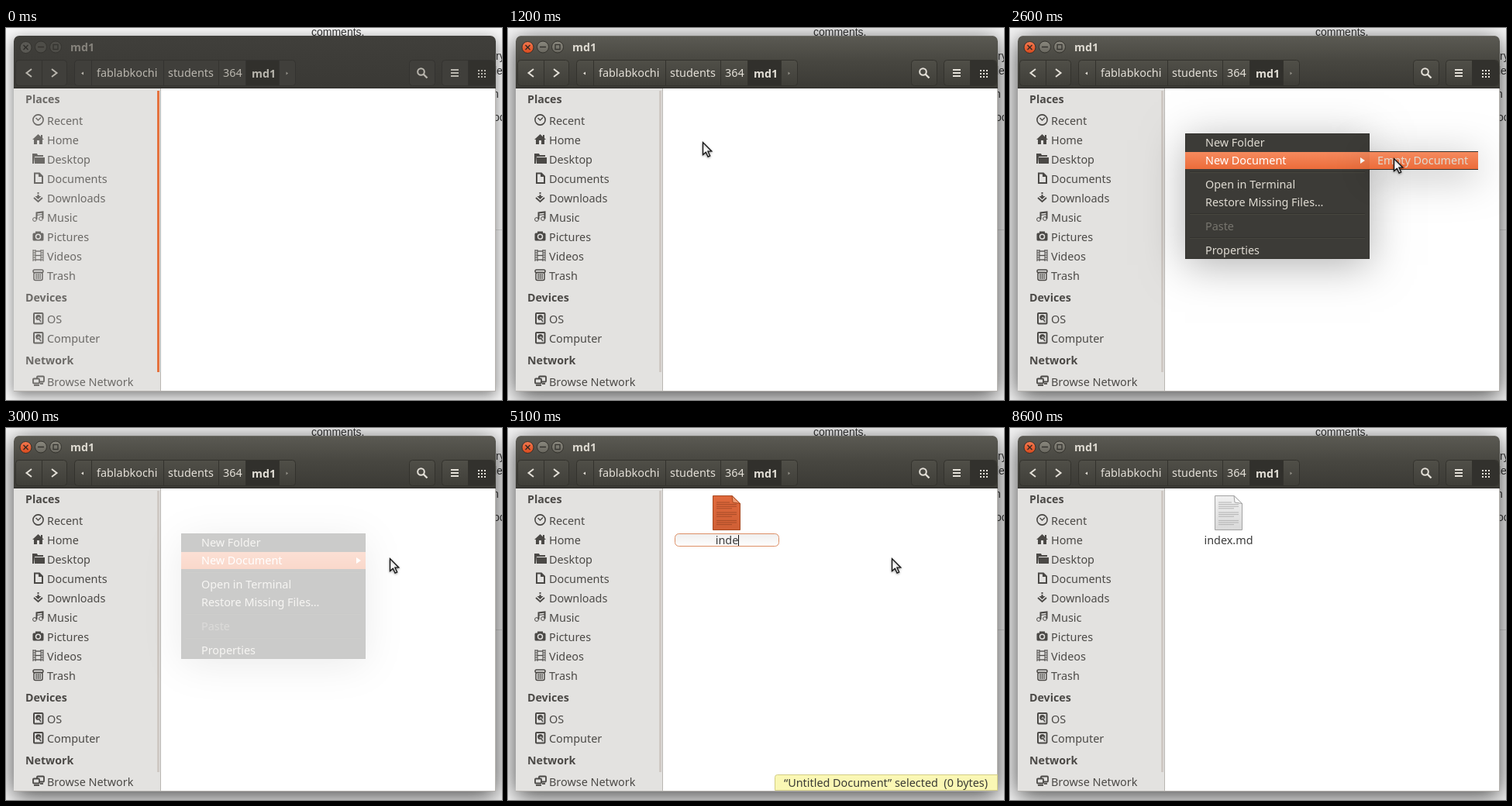
An HTML page with a canvas that plays this animation: 640x480 px, repeating every 8700 ms.

```html
<!DOCTYPE html>
<html lang="en">
<head>
<meta charset="utf-8">
<title>New document</title>
<style>
  html, body { margin: 0; width: 100%; height: 100%; overflow: hidden; background: #f5f5f5; }
  canvas { display: block; }
</style>
</head>
<body>
<canvas id="stage" width="640" height="480"></canvas>
<script>
const LOOP = 8700, STEP = 100;
const stage = document.getElementById('stage').getContext('2d');
const layer = document.createElement('canvas');
layer.width = 640;
layer.height = 480;
const menuCtx = layer.getContext('2d');
let g = stage;

const UI = '14.4px "Noto Sans", "Open Sans", sans-serif';
const BOLD = 'bold 14.2px "Noto Sans", "Open Sans", sans-serif';
const PAGE = '14px "Liberation Sans", Arial, sans-serif';

function text(str, x, y, color, font = UI, align = 'left') {
  g.font = font;
  g.textAlign = align;
  g.fillStyle = color;
  g.fillText(str, x, y);
}
function rect(x, y, w, h, color) {
  g.fillStyle = color;
  g.fillRect(x, y, w, h);
}
function round(x, y, w, h, r, fill, stroke) {
  g.beginPath();
  g.roundRect(x, y, w, h, r);
  paint(fill, stroke);
}
function disc(x, y, r, fill, stroke) {
  g.beginPath();
  g.arc(x, y, r, 0, Math.PI * 2);
  paint(fill, stroke);
}
function poly(points, fill, stroke) {
  g.beginPath();
  for (let i = 0; i < points.length; i += 2) g.lineTo(points[i], points[i + 1]);
  g.closePath();
  paint(fill, stroke);
}
function line(points, color, width = 1) {
  g.beginPath();
  for (let i = 0; i < points.length; i += 2) g.lineTo(points[i], points[i + 1]);
  g.lineWidth = width;
  g.strokeStyle = color;
  g.stroke();
  g.lineWidth = 1;
}
function paint(fill, stroke) {
  if (fill) { g.fillStyle = fill; g.fill(); }
  if (stroke) { g.strokeStyle = stroke; g.stroke(); }
}
function fade(y0, y1, ...colors) {
  const grad = g.createLinearGradient(0, y0, 0, y1);
  colors.forEach((c, i) => grad.addColorStop(i / (colors.length - 1), c));
  return grad;
}
function shadow(color, blur, dy) {
  g.shadowColor = color;
  g.shadowBlur = blur;
  g.shadowOffsetY = dy;
}
const noShadow = () => shadow('transparent', 0, 0);

// Sidebar icons, drawn in a 16 px box
const SIDE = '#e3e2e0';
const icons = {
  Recent(c) {
    g.lineWidth = 1.6;
    disc(7.5, 7.5, 6.6, null, c);
    line([4.5, 5, 7.5, 8, 11, 4.5], c, 1.4);
  },
  Home(c) {
    poly([0, 8, 7.5, 1, 15, 8, 13, 8, 13, 14, 9, 14, 9, 9, 6, 9, 6, 14, 2, 14, 2, 8], c);
    rect(11, 2, 2, 4, c);
  },
  Desktop(c) {
    poly([0, 1, 6, 1, 7, 3, 14, 3, 14, 5, 3, 5, 2, 14, 0, 14], c);
    rect(3, 6, 13, 8, c);
  },
  Documents(c) {
    g.lineWidth = 2;
    poly([3, 1.5, 9, 1.5, 13, 5.5, 13, 14, 3, 14], null, c);
    poly([8, 1, 13, 6, 8, 6], c);
  },
  Downloads(c) {
    rect(6.5, 1, 2, 2, c);
    rect(6.5, 4, 2, 3, c);
    poly([3.5, 6, 11.5, 6, 7.5, 10], c);
    line([2, 8, 7.5, 13, 13, 8], c, 1.8);
  },
  Music(c) {
    disc(3, 11, 2.4, null, c);
    disc(11, 10, 2.4, null, c);
    line([5.5, 11, 5.5, 2.5, 13.5, 1.5, 13.5, 10], c, 2);
    line([5.5, 5.5, 13.5, 4.5], c, 1.2);
  },
  Pictures(c) {
    round(0.5, 3.5, 14, 10, 1.5, c);
    rect(4, 1.5, 7, 3, c);
    g.lineWidth = 1.5;
    disc(7.5, 8.3, 3, c, SIDE);
  },
  Videos(c) {
    for (const x of [1, 4, 11, 14]) line([x, 0, x, 15], c);
    for (let y = 1; y < 15; y += 3) {
      line([1, y, 4, y], c);
      line([11, y, 14, y], c);
    }
    line([4, 2, 11, 2], c, 1.3);
    line([4, 7.5, 11, 7.5], c, 1.3);
    line([4, 13, 11, 13], c, 1.3);
  },
  Trash(c) {
    g.lineWidth = 1.5;
    round(1, 1, 13, 3.5, 2, null, c);
    round(2, 4.5, 11, 10, 2, null, c);
    for (const x of [5, 7.5, 10]) line([x, 6, x, 13], c, 1.3);
  },
  OS(c) {
    g.lineWidth = 2;
    round(2, 1, 11.5, 13.5, 1, null, c);
    disc(7.7, 6.5, 3.5, c);
    line([7.5, 6.5, 11, 11], SIDE, 2.4);
    line([8, 7.5, 11, 12], c, 1.4);
  },
  'Browse Network'(c) {
    g.lineWidth = 1.8;
    round(6, 1.5, 9, 7, 1, null, c);
    round(1, 4.5, 8, 6, 1, SIDE, c);
    line([2, 13, 9, 13], c, 1.8);
    line([10, 11, 14, 11], c, 1.8);
  }
};
icons.Computer = icons.OS;

const HEADS = [['Places', 97], ['Devices', 353], ['Network', 434]];
const ROWS = [
  ...['Recent', 'Home', 'Desktop', 'Documents', 'Downloads', 'Music', 'Pictures', 'Videos', 'Trash']
    .map((name, i) => [name, 125 + 25 * i]),
  ['OS', 381], ['Computer', 406], ['Browse Network', 462]
];

function drawPage() {
  rect(0, 0, 640, 480, '#f7f7f7');
  text('comments.', 394, 10, '#333', PAGE);
  text('ry', 632, 41, '#333', PAGE);
  text('le', 630, 60, '#333', PAGE);
  text('n', 628, 90, '#333', PAGE);
  text('oc', 629, 120, '#333', PAGE);
  rect(620, 260, 20, 1, '#dcdcdc');
}

function drawHeader(on) {
  const ink = on ? '#e4e0d8' : '#b9b6ae';
  const edge = on ? '#33322d' : '#343330';
  const face = on ? fade(42, 74, '#504f48', '#403f39') : '#403f3b';
  round(10, 10, 622, 68, [7, 7, 0, 0], on ? fade(10, 78, '#5b5a53', '#474640', '#3b3a35') : fade(10, 78, '#403f3b', '#3a3935'));
  if (on) rect(16, 10, 610, 1, '#6b6a63');
  rect(10, 77, 622, 1, '#2d2c29');

  const rim = on ? '#32312c' : '#34332f';
  disc(25.5, 25, 7.5, on ? fade(17, 33, '#f47b52', '#d9481b') : '#5a5954', rim);
  disc(45, 24.5, 7.5, on ? fade(17, 32, '#8a887e', '#69675f') : '#4e4d48', rim);
  disc(64, 24.5, 7.5, on ? fade(17, 32, '#8a887e', '#69675f') : '#4e4d48', rim);
  const mark = on ? '#3a2a22' : '#302f2c';
  line([22.5, 22, 28.5, 28], mark, 1.5);
  line([28.5, 22, 22.5, 28], mark, 1.5);
  line([41, 24.5, 49, 24.5], '#34332f', 1.5);
  g.lineWidth = 1.3;
  g.strokeStyle = '#34332f';
  g.strokeRect(61, 21.5, 6, 6);
  g.lineWidth = 1;
  text('md1', 83, 30, on ? '#dfdbd2' : '#86837c', BOLD);

  for (const [x, w] of [[12.5, 66], [88.5, 285], [520.5, 33], [562.5, 68]])
    round(x, 41.5, w, 33, 4, face, edge);
  rect(309, 42, 43, 32, '#31302c');
  round(596, 42, 34, 32, [0, 4, 4, 0], '#32312d');
  for (const x of [46, 110, 203, 274, 309, 352, 596]) rect(x, 42, 1, 32, edge);

  line([33, 53, 26.5, 58, 33, 63], ink, 2);
  line([59, 53, 65.5, 58, 59, 63], ink, 2);
  poly([97, 58.5, 100, 56.5, 100, 60.5], ink);
  poly([364, 58.5, 361.5, 56.5, 361.5, 60.5], '#96938b');
  text('fablabkochi', 117, 63, ink);
  text('students', 209, 63, ink);
  text('364', 280, 63, ink);
  text('md1', 317, 64, ink, BOLD);

  g.lineWidth = 2;
  disc(535.5, 56.5, 4.3, null, ink);
  line([538.5, 59.5, 543.5, 64.5], ink, 2.4);
  for (let i = 0; i < 3; i++) {
    rect(574, 53 + 4 * i, 10, 2, ink);
    for (let j = 0; j < 3; j++) rect(609 + 4 * j, 54 + 4 * i, 2, 2, ink);
  }
}

function drawSidebar(on) {
  const ink = on ? '#4b4946' : '#6c6a67';
  rect(10, 78, 189, 390, SIDE);
  rect(199, 78, 1, 390, '#b9b6b2');
  rect(195, 81, 3, 363, on ? '#cfc9c4' : '#e5733f');
  for (const [name, y] of HEADS) text(name, 25, y, ink, BOLD);
  for (const [name, y] of ROWS) {
    text(name, 53, y, ink);
    g.save();
    g.translate(34, y - 14);
    icons[name](ink);
    g.restore();
  }
}

function drawWindow(on) {
  if (on) shadow('rgba(0,0,0,.72)', 30, 6);
  else shadow('rgba(0,0,0,.5)', 18, 5);
  round(10, 10, 622, 459, [7, 7, 0, 0], '#fff');
  noShadow();
  rect(10, 78, 622, 390, '#fff');
  drawHeader(on);
  drawSidebar(on);
  rect(10, 468, 622, 1, '#b5b2ae');
  rect(631, 78, 1, 390, '#b5b2ae');
}

function drawFile(selected) {
  const edge = selected ? '#a8481f' : '#a3a3a3';
  const body = selected ? fade(87, 132, '#e0693c', '#cf5f35') : fade(87, 132, '#f0f0f0', '#d9d9d9');
  poly([264.5, 87.5, 289, 87.5, 299.5, 97.5, 299.5, 131.5, 264.5, 131.5], body, edge);
  poly([289, 87.5, 290, 96, 299.5, 97.5], selected ? '#ee9a72' : '#fafafa', edge);
  for (let i = 0; i < 12; i++) {
    if (i === 4 || i === 8) continue;
    const end = i < 1 ? 17 : i === 3 || i === 7 || i === 11 ? 20 : 26;
    rect(269, 95.5 + i * 2.6, end, 1, selected ? '#a84c28' : '#b4b4b4');
  }
}

const TYPING = [[4100, 1], [4400, 2], [4700, 3], [5000, 4], [5800, 5], [6500, 6], [7100, 7], [7400, 8]];
const NAME = 'index.md';

function drawEntry(t) {
  round(215.5, 136.5, 134, 16, 5, fade(136, 153, '#efeeed', '#fff'), '#dd8f66');
  const count = TYPING.reduce((n, [at, len]) => t >= at ? len : n, 0);
  if (!count) {
    const old = 'Untitled Document';
    g.font = UI;
    const w = g.measureText(old).width;
    rect(282 - w / 2, 138, w, 14, '#f07746');
    text(old, 282, 150, '#fff', UI, 'center');
    return;
  }
  const typed = NAME.slice(0, count);
  text(typed, 282.5, 150, '#3c3c3c', UI, 'center');
  rect(Math.round(282.5 + g.measureText(typed).width / 2), 138, 1, 14, '#111');
}

function drawStatus() {
  round(344.5, 447.5, 287, 20, [3, 0, 0, 0], '#faf7b4', '#d2cd86');
  text('“Untitled Document” selected  (0 bytes)', 356, 463, '#3a3a34');
}

const ITEMS = [['New Folder', 153], ['New Document', 176], ['Open in Terminal', 207],
  ['Restore Missing Files…', 230], ['Paste', 261], ['Properties', 292]];

function panel(x, y, w, h) {
  shadow('rgba(0,0,0,.3)', 50, 8);
  rect(x, y, w, h, '#3c3b37');
  noShadow();
  g.strokeStyle = '#33322e';
  g.strokeRect(x + .5, y + .5, w - 1, h - 1);
}
const glow = (x, w) => rect(x, 160, w, 22, fade(160, 182, '#f58a5e', '#ec6c3a'));

function drawMenu(t) {
  g = menuCtx;
  g.clearRect(0, 0, 640, 480);
  panel(226, 136, 238, 162);
  const hot = t >= 2100;
  if (hot) glow(226, 238);
  for (const y of [185, 239, 270]) {
    rect(232, y, 226, 1, '#33322e');
    rect(232, y + 1, 226, 1, '#47463f');
  }
  for (const [label, y] of ITEMS)
    text(label, 252, y, label === 'Paste' ? '#77756e' : hot && y === 176 ? '#fff' : '#dfdbd2');
  poly([452, 167, 458, 171, 452, 175], hot ? '#fff' : '#dfdbd2');
  if (t >= 2300 && t < 3000) {
    panel(464, 159, 140, 24);
    if (t >= 2600) glow(464, 140);
    text('Empty Document', 474, 176, '#dfdbd2');
  }
  g = stage;
  g.globalAlpha = t >= 3000 ? .26 : Math.min(1, (t - 1600) / 300);
  g.drawImage(layer, 0, 0);
  g.globalAlpha = 1;
}

// Pointer path: time, x, y
const PATH = [[100, 642, 330], [500, 256, 150], [1100, 256, 150], [1500, 226, 136], [1800, 226, 136],
  [2000, 289, 181], [2200, 380, 172], [2600, 495, 169], [8200, 495, 169], [8600, 642, 250]];

function drawPointer(t) {
  const i = PATH.findIndex(p => t < p[0]);
  if (i < 1) return;
  const [t0, x0, y0] = PATH[i - 1], [t1, x1, y1] = PATH[i];
  const k = (t - t0) / (t1 - t0), e = k * k * (3 - 2 * k);
  g.save();
  g.translate(Math.round(x0 + (x1 - x0) * e) + .5, Math.round(y0 + (y1 - y0) * e) - .5);
  shadow('rgba(0,0,0,.35)', 3, 1);
  g.lineWidth = 1.3;
  poly([0, 0, 0, 16, 3.8, 12.7, 6.6, 18.7, 9.2, 17.5, 6.4, 11.7, 11.3, 11.5], '#fff', '#111');
  g.restore();
}

function draw(now) {
  const t = Math.floor(now % LOOP / STEP) * STEP;
  g.lineWidth = 1;
  drawPage();
  drawWindow(t >= 200);
  if (t >= 3200) {
    const editing = t < 8200;
    drawFile(editing);
    if (editing) drawEntry(t);
    else text(NAME, 282, 150, '#3c3c3c', UI, 'center');
    if (t >= 3400 && t < 8300) drawStatus();
  }
  if (t >= 1700 && t < 3100) drawMenu(t);
  drawPointer(t);
}

const start = performance.now();
function tick() {
  draw(performance.now() - start);
  requestAnimationFrame(tick);
}
tick();
</script>
</body>
</html>
```
